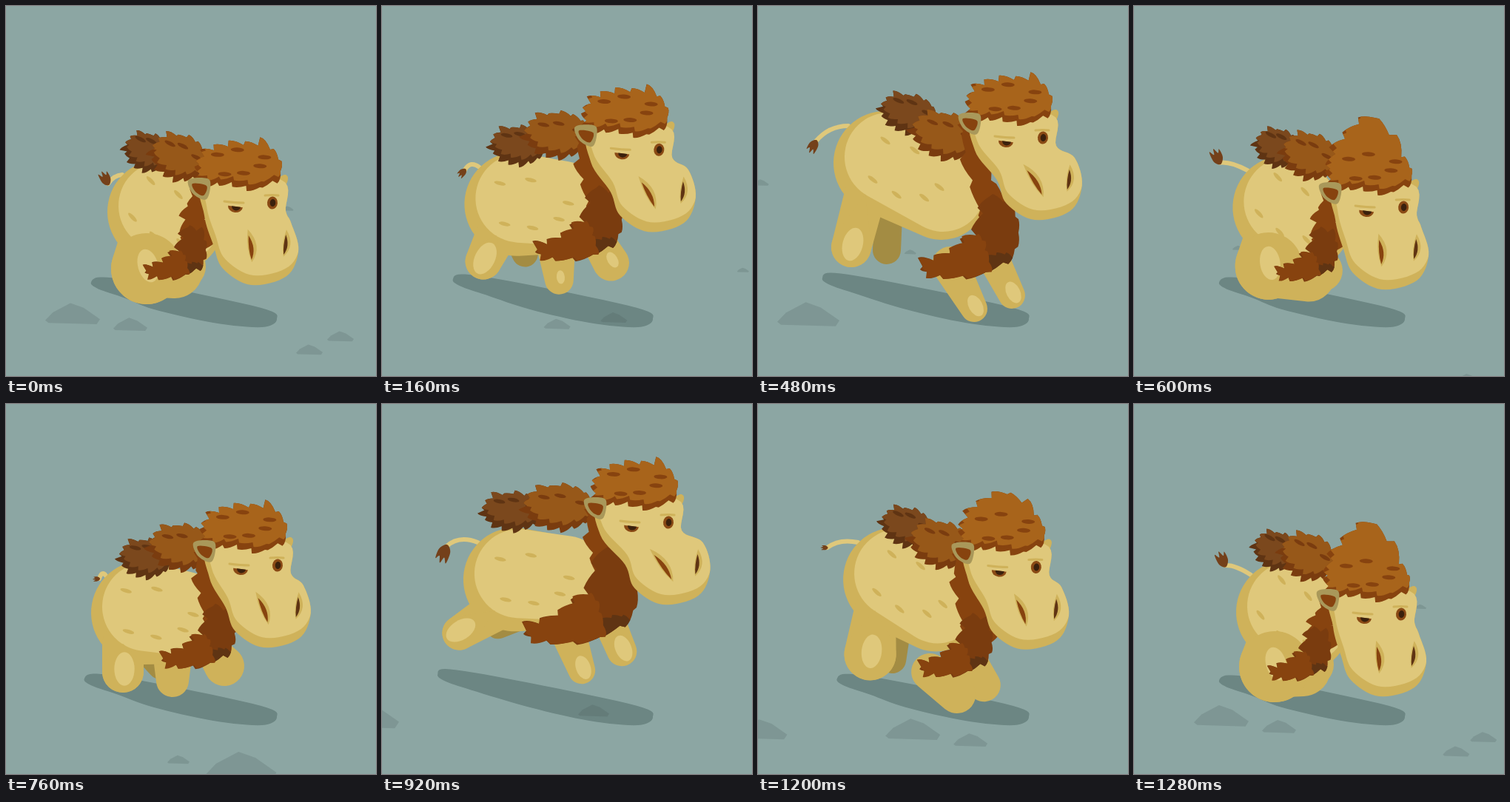
Animation, 500 px wide and 500 px high, one loop 1.32 s. Source, as an HTML page with a canvas:

```html
<!DOCTYPE html>
<html lang="en">
<head>
<meta charset="utf-8">
<title>Galloping camel</title>
<style>
html, body { margin: 0; width: 100%; height: 100%; overflow: hidden; background: #8ca6a3; }
canvas { display: block; width: 500px; height: 500px; }
</style>
</head>
<body>
<canvas id="stage" width="500" height="500"></canvas>
<script>
const c = document.getElementById('stage').getContext('2d');
const LOOP = 1320, STRIDE = 660, STEP = 40, TAU = Math.PI * 2;
const SKY = '#8ca6a3', LIGHT = '#dfc87b', SHADE = '#cfb25a', FAR = '#a38c43';
const HAIR = '#a8641b', MANE = '#87430f', CHEST = '#7a3c0f', DARK = '#5f3413', EYE = '#8a4a15', PUPIL = '#3a210d';

// Joints at five moments of a stride: tuck, rise, flight, landing, drop.
const TIMES = [0, 100, 300, 480, 620];
const JOINTS = {
  head: [[335,269,0], [342,221,0], [365,156,0], [360,181,0], [336,287,45]], // third: hair lift
  rump: [[207,278], [185,282], [179,228], [172,212], [208,281]],
  chest: [[250,338], [285,320], [312,265], [320,320], [245,342]],
  humpBack: [[192,197], [190,208], [177,134], [205,145], [193,198]],
  humpFront: [[235,204], [237,193], [242,133], [254,175], [236,206]],
  tail: [[138,240], [126,236], [80,185], [78,183], [123,218]],
  hind: [[190,355,48], [158,362,28], [98,302,23], [126,326,27], [190,355,48]], // feet: x, y, radius
  hindFar: [[190,365,18], [209,354,18], [149,294,17], [174,330,19], [190,365,18]],
  front: [[228,357,38], [225,374,22], [279,361,18], [292,409,18], [228,357,38]],
  frontFar: [[240,352,30], [295,354,27], [329,335,19], [343,391,18], [240,352,30]]
};

const mod = (a, n) => ((a % n) + n) % n;
const clamp = v => Math.max(0, Math.min(1, v));
const rnd = k => mod(Math.sin(k * 12.9898 + 4.1) * 43758.5453, 1);
const add = (p, x, y) => [p[0] + x, p[1] + y];
const mix = (a, b, s) => [a[0] + (b[0] - a[0]) * s, a[1] + (b[1] - a[1]) * s];
const shift = (pts, x, y) => pts.map(p => add(p, x, y));

// Periodic cubic interpolation between the key moments.
function joint(keys, p) {
  const n = TIMES.length;
  const time = i => TIMES[mod(i, n)] + Math.floor(i / n) * STRIDE;
  let i = n - 1;
  while (TIMES[i] > p) i--;
  const near = [i - 1, i, i + 1, i + 2];
  const [t0, t1, t2, t3] = near.map(time), [a, b, d, e] = near.map(k => keys[mod(k, n)]);
  const h = t2 - t1, s = (p - t1) / h, s2 = s * s, s3 = s2 * s;
  return b.map((v, k) => {
    const m1 = (d[k] - a[k]) / (t2 - t0) * h, m2 = (e[k] - v) / (t3 - t1) * h;
    return v * (2 * s3 - 3 * s2 + 1) + m1 * (s3 - 2 * s2 + s) + d[k] * (3 * s2 - 2 * s3) + m2 * (s3 - s2);
  });
}

function rigAt(p) {
  const rig = {};
  for (const name in JOINTS) rig[name] = joint(JOINTS[name], p);
  rig.rise = clamp((275 - rig.head[1]) / 115);
  rig.muzzle = add(rig.head, 4 + 23 * rig.rise, 56);
  rig.shoulder = add(mix(rig.rump, rig.chest, .5), 2, -12);
  rig.tilt = Math.atan2(rig.shoulder[1] - rig.rump[1], rig.shoulder[0] - rig.rump[0]);
  return rig;
}

function fill(color) { c.fillStyle = color; c.fill(); }
function inside(draw) { c.save(); c.clip(); draw(); c.restore(); }

function spline(pts, i, s) {
  return [0, 1].map(k => {
    const [a, b, d, e] = [-1, 0, 1, 2].map(o => pts[mod(i + o, pts.length)][k]);
    return .5 * (2 * b + (d - a) * s + (2 * a - 5 * b + 4 * d - e) * s * s + (3 * b - a - 3 * d + e) * s ** 3);
  });
}
function smooth(pts, color) {
  c.beginPath();
  for (let k = 0; k < pts.length * 8; k++) c.lineTo(...spline(pts, k >> 3, k % 8 / 8));
  c.closePath();
  fill(color);
}
// Clockwise outline with two locks per segment, swept to the left.
function fur(pts, size, color) {
  c.beginPath();
  c.moveTo(...pts[0]);
  for (let k = 0; k < pts.length * 2; k++) {
    const p = spline(pts, k >> 1, k % 2 / 2), q = spline(pts, k >> 1, k % 2 / 2 + .5);
    const dx = q[0] - p[0], dy = q[1] - p[1], len = Math.hypot(dx, dy) || 1;
    const r = Math.min(size, len) * (.15 + .8 * rnd(k + 9)), nx = dy / len * r, ny = -dx / len * r;
    const back = dx < 0, tip = add(mix(p, q, back ? .8 : .2), nx - r * .35, ny);
    const bulge = add(mix(tip, back ? p : q, .45), nx * .45, ny * .45);
    if (back) {
      c.quadraticCurveTo(...bulge, ...tip);
      c.lineTo(...q);
    } else {
      c.lineTo(...tip);
      c.quadraticCurveTo(...bulge, ...q);
    }
  }
  c.closePath();
  fill(color);
}
function poly(pts, color) {
  c.beginPath();
  pts.forEach(p => c.lineTo(...p));
  fill(color);
}
function oval(p, rx, ry, rot, color, end = TAU) {
  c.beginPath();
  c.ellipse(p[0], p[1], rx, ry, rot, 0, end);
  fill(color);
}
function ring(p, rx, ry, rot, n = 8) {
  return Array.from({ length: n }, (_, i) => {
    const x = rx * Math.cos(i * TAU / n), y = ry * Math.sin(i * TAU / n);
    return add(p, x * Math.cos(rot) - y * Math.sin(rot), x * Math.sin(rot) + y * Math.cos(rot));
  });
}
// Two circles joined by their outer tangents.
function limb(a, ra, b, rb, color) {
  const d = Math.hypot(b[0] - a[0], b[1] - a[1]), dir = Math.atan2(b[1] - a[1], b[0] - a[0]);
  const k = Math.acos(Math.max(-1, Math.min(1, (ra - rb) / (d || 1))));
  c.beginPath();
  c.arc(a[0], a[1], ra, dir + k, dir - k + TAU);
  c.arc(b[0], b[1], rb, dir - k, dir + k);
  c.closePath();
  fill(color);
}
function stroke(a, bend, b, w, color) {
  c.beginPath();
  c.moveTo(...a);
  c.quadraticCurveTo(...bend, ...b);
  c.lineWidth = w;
  c.lineCap = 'round';
  c.strokeStyle = color;
  c.stroke();
}
function leaf(a, b, w, color) {
  const m = mix(a, b, .55), dx = b[0] - a[0], dy = b[1] - a[1], l = Math.hypot(dx, dy);
  c.beginPath();
  c.moveTo(...a);
  c.quadraticCurveTo(m[0] + dy / l * w * 1.5, m[1] - dx / l * w * 1.5, ...b);
  c.quadraticCurveTo(m[0] - dy / l * w * .5, m[1] + dx / l * w * .5, ...a);
  fill(color);
}
// Rows of short flecks around a centre.
function flecks(p, count, w, h, rot, len, color) {
  for (let i = 0; i < count; i++) {
    const x = (i % 3 - 1 + (rnd(i) - .5) * .6) * w, y = (Math.floor(i / 3) - .5 + (rnd(i + 5) - .5) * .7) * h;
    const at = add(p, x * Math.cos(rot) - y * Math.sin(rot), x * Math.sin(rot) + y * Math.cos(rot));
    oval(at, len, len * .33, rot + .15, color);
  }
}

// Ground covered since zero: slow in the tuck, fast in flight.
function travel(t) {
  const a = TAU * t / STRIDE;
  return 72 * t / STEP - (40 * Math.sin(a) + 3.5 * Math.sin(2 * a)) / (TAU * STEP / STRIDE);
}
// moment, x, y, width
const ROCKS = [
  [0, 90,417,74], [0, 168,431,46], [0, 452,447,36], [0, 410,465,36], [480, 68,418,84], [320, 104,245,22],
  [320, 349,345,16], [760, 233,481,30], [760, 318,490,95], [920, 286,415,42], [1080, 265,493,70],
  [1080, 195,462,36], [1080, 427,266,26], [1080, 469,279,16]
];
function ground(t, rise) {
  const l = 115 - 42 * rise * rise, y = 358 + (l - 73) * .2;
  smooth([[l, y + 7], [l + 17, y], [200, 377], [345, 408], [366, 423], [346, 434],
    [280, 428], [200, 410], [l + 45, y + 28], [l + 10, y + 16]], '#6c8683');
  for (const [t0, x, y0, w] of ROCKS) {
    const dt = mod(t - t0 + LOOP / 2, LOOP) - LOOP / 2;
    if (Math.abs(dt) > 400) continue;
    const depth = (y0 - x * .2 - 200) / 200, speed = Math.min(1.05, .24 + .85 * depth * depth);
    const d = speed * (travel(t0 + dt) - travel(t0)), p = [x - d, y0 - d * .2 * Math.min(1, speed * 1.2)];
    const h = w * .42;
    poly([[-.5, .25], [-.36, -.1], [-.04, -.5], [.2, -.3], [.5, .2], [.44, .42], [-.44, .36]]
      .map(q => add(p, q[0] * w, q[1] * h)), 'rgba(60,80,78,.18)');
  }
}

function leg(root, r, foot, color, sole) {
  limb(root, r, foot, foot[2], color);
  const long = Math.min(foot[2], 24) * sole;
  if (long > 1) {
    const rot = Math.atan2(foot[1] - root[1], foot[0] - root[0]);
    oval(add(foot, 2, -4), long, long * .6, rot, LIGHT);
  }
}

function drawTail({ tail, rump, rise }) {
  const base = add(rump, -50, -50), dx = -8 / 22, dy = (38 * rise - 17) / 22;
  stroke(base, add(mix(base, tail, .6), 0, -6 - 8 * rise), tail, 6, LIGHT);
  const at = (u, v) => add(tail, dx * u - dy * v, dy * u + dx * v);
  smooth([at(-3, 0), at(5, -8), at(22, -8), at(15, -3), at(24, 0), at(15, 4), at(20, 8), at(6, 8)], '#74401a');
}

function drawBody(rig) {
  const { rump, shoulder, chest, rise, tilt } = rig, sole = .9 * clamp((rise - .5) * 3);
  leg(add(rump, 5, 50), 19, rig.hindFar, FAR, 0);
  leg(add(chest, -5, 15), 22, rig.frontFar, SHADE, sole);
  leg(add(chest, -60, 30), 25, rig.front, SHADE, sole);
  limb(rump, 70, shoulder, 62, SHADE);
  leg(add(rump, -27, 42), 28, rig.hind, SHADE, 0);
  limb(add(rump, 5, -8), 60, add(shoulder, 2, -6), 57, LIGHT);
  flecks(mix(rump, shoulder, .35), 6, 42, 44, tilt, 8, SHADE);
  leg(add(rump, -27, 42), 0, rig.hind, SHADE, .95);
}

function drawHump(p, rx, ry, rot, dark, light) {
  const shape = ring(p, rx, ry, rot);
  fur(shape, 13, dark);
  inside(() => fur(shift(shape, 3, -9), 11, light));
  flecks(add(p, 2, -4), 3, rx * .5, 14, rot, 8, dark);
}

function drawChest({ head, chest, rise }) {
  const top = add(head, -72, -12), end = add(chest, 14, -18), mid = add(mix(top, end, .5), -9, 0);
  fur([add(top, -11, 0), add(top, 11, 0), add(mid, 13, 0), add(end, 18, 0), add(end, -20, 4), add(mid, -12, 0)], 12, MANE);
  const s = .52 + .48 * rise * rise, at = (x, y) => add(chest, x * s, y * s);
  const tip = [at(-116, 38), at(-72, 17), at(-30, -12)], under = [at(-14, 47), at(-88, 52)];
  fur([...tip, at(-8, -75), at(33, -42), at(32, 10), ...under], 15, CHEST);
  inside(() => fur(ring(at(8, 40), 26 * s, 20 * s, -.7, 5), 10, DARK));
  fur([...tip, at(-16, 12), ...under], 13, MANE);
}

function drawHead({ head, muzzle, rise }) {
  const H = (x, y) => add(head, x, y), M = (x, y) => add(muzzle, x, y);
  smooth([H(30, -33), H(41, -41), H(46, -37), H(43, -27), H(35, -22)], SHADE);

  const skull = [H(-66, -34), H(37, -34), H(43, 8), M(45, -32), M(55, 5), M(39, 40), M(-9, 52),
    M(-47, 30), M(-60, -2), H(-67, 14)];
  smooth(skull, SHADE);
  inside(() => smooth(shift(skull, 3, -13), LIGHT));

  const nostril = (a, b, w, color) => {
    leaf(mix(a, b, -.25), mix(a, b, 1.1), w * 2, SHADE);
    leaf(a, b, w, color);
  };
  nostril(M(-12 - 9 * rise, -15), M(-9 + 12 * rise, 18), 6, MANE);
  nostril(M(38, -16), M(35, 11), 5, DARK);

  stroke(H(-40, -5), H(-25, -3), H(-14, -3), 3, SHADE);
  oval(H(-25, 2), 10, 8, .12, EYE, Math.PI);
  oval(H(-24, 2), 6, 5.5, .12, PUPIL, Math.PI);
  stroke(H(15, -13), H(25, -14), H(33, -13), 3, SHADE);
  oval(H(25, -3), 7, 8.5, .1, EYE);
  oval(H(25.5, -3), 3.8, 5, .1, PUPIL);

  const up = Math.max(0, head[2]);
  const hair = [H(-65, -32), H(-74, -55), H(-54, -74 - up * .5), H(-14, -81 - up), H(22, -75 + up * .1),
    H(36, -46), H(8, -24), H(-30, -31)];
  fur(hair, 16, MANE);
  inside(() => fur(shift(hair, 2, -8), 14, HAIR));
  flecks(H(-18, -58), 6, 28, 22, -.1, 9, MANE);

  smooth([H(-89, -33), H(-72, -37), H(-59, -32), H(-64, -8), H(-82, -15)], '#a9985a');
  smooth([H(-83, -29), H(-64, -26), H(-68, -13), H(-79, -18)], MANE);
}

function draw(t) {
  const rig = rigAt(t % STRIDE), size = 29 + 10 * rig.rise;
  c.fillStyle = SKY;
  c.fillRect(0, 0, 500, 500);
  ground(t, rig.rise);
  drawTail(rig);
  drawBody(rig);
  drawHump(rig.humpBack, size, 23, rig.tilt * .5, DARK, '#7b481d');
  drawHump(rig.humpFront, size + 6, 28, rig.tilt * .5, CHEST, '#975819');
  drawChest(rig);
  drawHead(rig);
}

const start = performance.now();
function tick() {
  const t = (performance.now() - start) % LOOP;
  draw(Math.floor(t / STEP) * STEP);
  requestAnimationFrame(tick);
}
tick();
</script>
</body>
</html>
```
